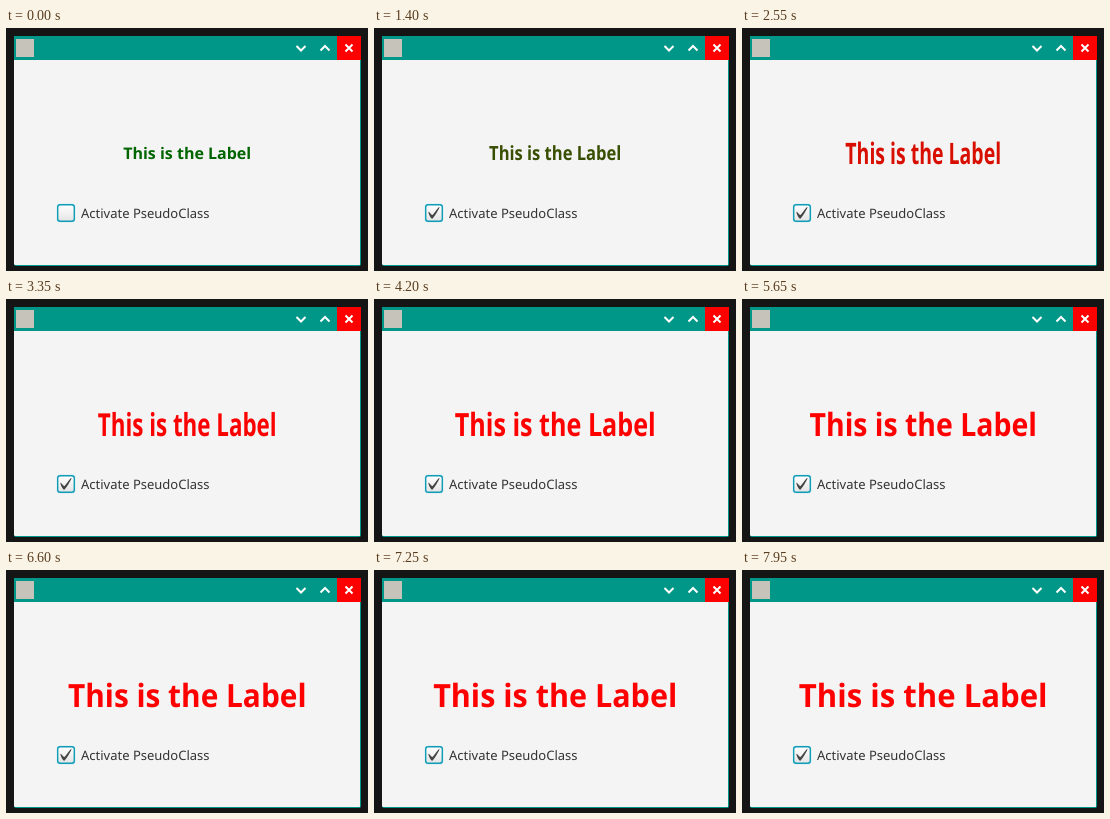
Animation of 362 by 243 pixels, one loop 8 s. Source, as an HTML page:

```html
<!DOCTYPE html>
<html lang="en">
<head>
<meta charset="utf-8">
<title>Label transition</title>
<style>
  html, body { margin: 0; width: 100%; height: 100%; overflow: hidden; background: #151515; }
  svg { display: block; width: 362px; height: 243px; }
  text { font-family: "Noto Sans", "Open Sans", sans-serif; text-rendering: geometricPrecision; }
  #label { font-size: 16px; font-weight: 700; text-anchor: middle; }
  .caption { font-size: 13px; fill: #333; }
  .icons path { fill: none; stroke: #fff; stroke-width: 2; }
</style>
</head>
<body>
<svg viewBox="0 0 362 243">
  <defs>
    <linearGradient id="boxFill" x2="0" y2="1">
      <stop offset="0" stop-color="#fff"/>
      <stop offset="1" stop-color="#e4e4e4"/>
    </linearGradient>
  </defs>

  <rect width="362" height="243" fill="#151515"/>
  <path d="M8 8H355V236Q355 238 353 238H10Q8 238 8 236Z" fill="#009688"/>
  <path d="M8 32H354V237H9.500Q8 237 8 235.500Z" fill="#f4f4f4"/>
  <rect x="331" y="8" width="24" height="24" fill="#f00"/>
  <rect x="10" y="11" width="18" height="18" fill="#c6c3bb"/>
  <g class="icons">
    <path d="M290.500 18L295 22.500L299.500 18"/>
    <path d="M314.500 22.500L319 18L323.500 22.500"/>
    <path d="M339.500 16.500L346.500 23.500M346.500 16.500L339.500 23.500"/>
  </g>

  <text id="label" y="6.200">This is the Label</text>

  <rect x="50.500" y="175.500" width="19" height="19" rx="3.500" fill="#cfeaf2"/>
  <rect x="51.700" y="176.700" width="16.600" height="16.600" rx="2.500"
        fill="url(#boxFill)" stroke="#0f9cb4" stroke-width="1.400"/>
  <path id="check" fill="#444" transform="translate(54.600 179.700) scale(.68)"
        d="M-.2 6C.6 5.300 4.300 10.900 5.500 10.900S14.500-1.500 15.900-.9C17.200-.4 7.200 16.200 5.400 16.200C3 16.200-1 6.800-.2 6Z"/>
  <text class="caption" x="75" y="190">Activate PseudoClass</text>
</svg>
<script>
const LOOP = 8000, STEP = 50, CHECKED_AT = 900;
const FAST = 3000, SLOW = 10000;
const FROM = [0, 100, 0], TO = [255, 0, 0];
const label = document.getElementById("label");
const check = document.getElementById("check");

const bezier = (a, b, s) => 3 * (1 - s) ** 2 * s * a + 3 * (1 - s) * s * s * b + s ** 3;

// cubic-bezier(.25, .1, .25, 1)
function ease(x) {
  if (x <= 0) return 0;
  if (x >= 1) return 1;
  let low = 0, high = 1;
  for (let i = 0; i < 24; i++) {
    const mid = (low + high) / 2;
    if (bezier(0.25, 0.25, mid) < x) low = mid; else high = mid;
  }
  return bezier(0.1, 1, low);
}

function draw(time) {
  const elapsed = time - CHECKED_AT;
  const fast = ease(elapsed / FAST);
  const slow = ease(elapsed / SLOW);
  const color = FROM.map((c, i) => Math.round(c + (TO[i] - c) * fast));
  label.setAttribute("transform", `translate(181.2 124.8) scale(${1 + slow} ${1 + fast})`);
  label.setAttribute("fill", `rgb(${color})`);
  check.setAttribute("visibility", elapsed >= 0 ? "visible" : "hidden");
}

const start = performance.now();
function tick() {
  const time = (performance.now() - start) % LOOP;
  draw(Math.floor(time / STEP) * STEP);
  requestAnimationFrame(tick);
}
tick();
</script>
</body>
</html>
```
